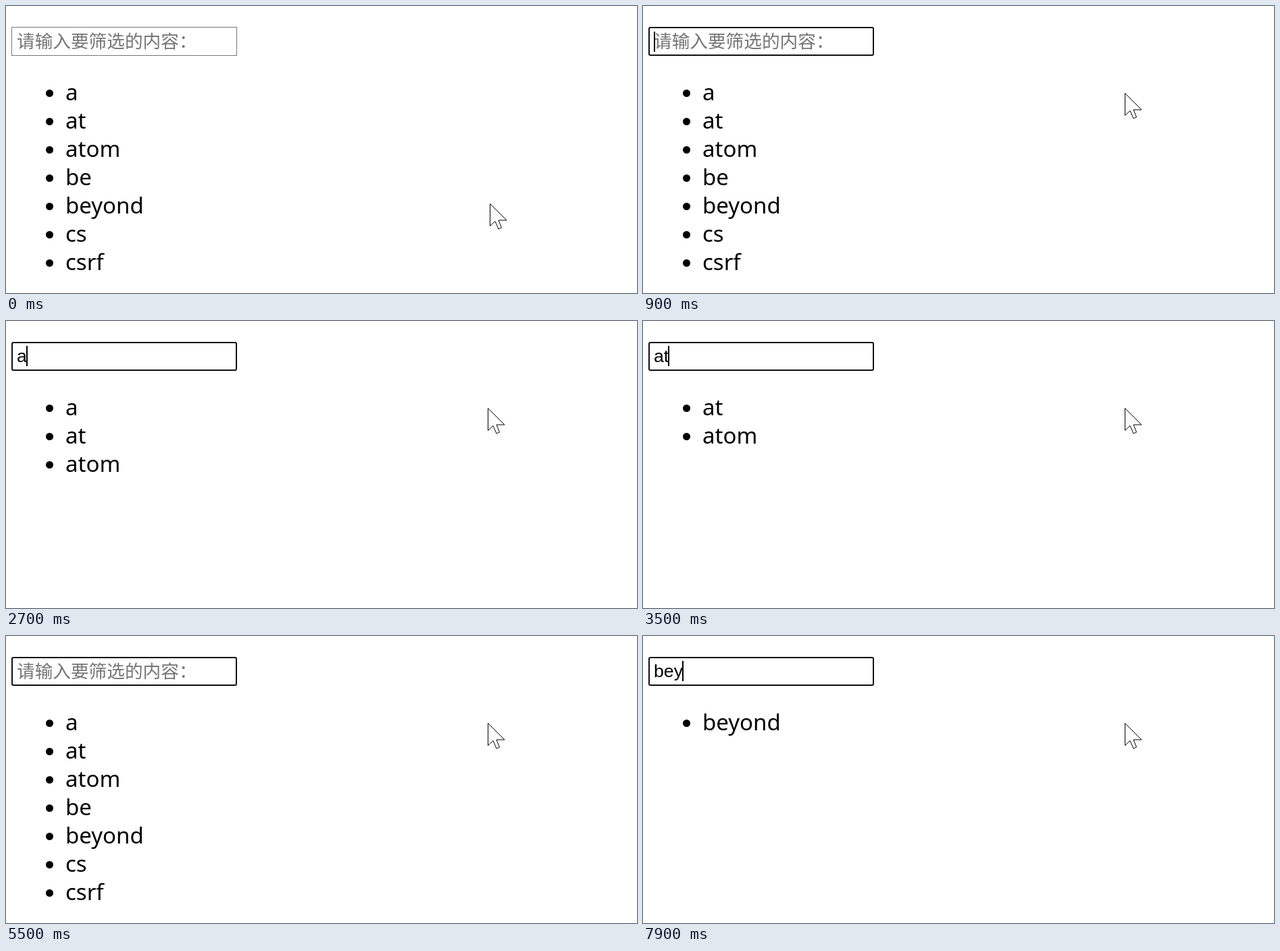
Animation of 934x426 px, one loop 8000 ms. Source, as an HTML page:

```html
<!DOCTYPE html>
<html lang="zh-CN">
<head>
<meta charset="utf-8">
<title>列表筛选</title>
<style>
  html, body { margin: 0; width: 100%; height: 100%; overflow: hidden; background: #fff; }
  svg { display: block; width: 934px; height: 426px; }
  #list { font: 33px "Noto Sans", "Open Sans", sans-serif; }
  #field { fill: #fff; stroke: #767676; }
  #field.hover { stroke: #4f4f4f; }
  #field.focus { stroke: #101010; stroke-width: 2; }
  #hint { font: 26.667px "Noto Sans CJK SC", "Noto Sans CJK", sans-serif; fill: #757575; }
  #value { font: 26.667px "Liberation Sans", Arial, sans-serif; }
</style>
</head>
<body>
<svg viewBox="0 0 934 426">
  <rect id="field"/>
  <text id="hint" x="16" y="62">请输入要筛选的内容：</text>
  <text id="value" x="16" y="61"></text>
  <rect id="caret" width="2" height="30"/>
  <g id="list"></g>
  <path id="arrow" d="M.5 .5V33.5L8 26.5L13 38L17.5 36L13 25H25Z" fill="#fff" stroke="#000"/>
  <path id="beam" d="M-9.5-17h8l1.5 1.5 1.5-1.5h8v3h-8v28h8v3h-8l-1.5-1.5-1.5 1.5h-8v-3h8v-28h-8z"/>
</svg>
<script>
const LOOP = 8000;
const ITEMS = ['a', 'at', 'atom', 'be', 'beyond', 'cs', 'csrf'];

// Each track holds [start ms, ...state]; a state lasts until the next one.
const TYPED = [
  [0, ''], [1700, 'a'], [3500, 'at'], [4300, 'ato'], [4700, 'atom'], [5100, 'ato'],
  [5200, 'at'], [5300, 'a'], [5500, ''], [6600, 'b'], [7400, 'be'], [7900, 'bey']
];
const POINTER = [
  [0, 'arrow', 716, 293], [100, 'arrow', 610, 218], [200, 'arrow', 420, 112],
  [300, 'beam', 258, 33], [400, 'beam', 257.5, 36],
  [800, 'arrow', 540, 96], [900, 'arrow', 713, 129]
];
const CARET_TOGGLES = [
  700, 1200, 1700, 2200, 2700, 3200, 3500, 4000,
  4300, 5200, 5700, 6100, 6600, 7100, 7400
];
const FOCUS_AT = 700, HOVER_AT = 300;
const SLOW_FILTER = { from: 6600, to: 6700 };

const el = id => document.getElementById(id);
const stateAt = (track, t) => track.filter(([start]) => start <= t).pop().slice(1);
const show = (node, on) => { node.style.display = on ? '' : 'none'; };
const place = (node, attrs) => {
  for (const name in attrs) node.setAttribute(name, attrs[name]);
};

function make(tag, parent, attrs) {
  const node = document.createElementNS('http://www.w3.org/2000/svg', tag);
  place(node, attrs);
  return parent.appendChild(node);
}

const rows = ITEMS.map((_, i) => {
  const row = make('g', el('list'), { transform: `translate(0 ${42 * i})` });
  make('circle', row, { cx: 64.5, cy: 129.5, r: 5.5 });
  return { row, label: make('text', row, { x: 88, y: 140 }) };
});

function drawField(t, typed) {
  const focused = t >= FOCUS_AT;
  const inset = focused ? 1 : 0.5;
  el('field').setAttribute('class', focused ? 'focus' : t >= HOVER_AT ? 'hover' : '');
  place(el('field'), {
    x: 8 + inset, y: 31 + inset, rx: focused ? 2 : 0,
    width: 334 - 2 * inset, height: 43 - 2 * inset
  });
  show(el('hint'), !typed);
  el('value').textContent = typed;

  const end = typed ? 15 + el('value').getComputedTextLength() : 16;
  place(el('caret'), { x: Math.round(end), y: typed ? 37 : 38 });
  show(el('caret'), CARET_TOGGLES.filter(at => at <= t).length % 2);
}

function drawList(t, typed) {
  const late = t >= SLOW_FILTER.from && t < SLOW_FILTER.to;
  const matches = ITEMS.filter(item => item.includes(late ? '' : typed));
  rows.forEach(({ row, label }, i) => {
    show(row, i < matches.length);
    label.textContent = matches[i] || '';
  });
}

function drawPointer(t) {
  const [kind, x, y] = stateAt(POINTER, t);
  for (const id of ['arrow', 'beam']) {
    show(el(id), id === kind);
    place(el(id), { transform: `translate(${x} ${y})` });
  }
}

const begin = performance.now();
function draw() {
  const t = (performance.now() - begin) % LOOP;
  const [typed] = stateAt(TYPED, t);
  drawField(t, typed);
  drawList(t, typed);
  drawPointer(t);
  requestAnimationFrame(draw);
}
draw();
</script>
</body>
</html>
```
